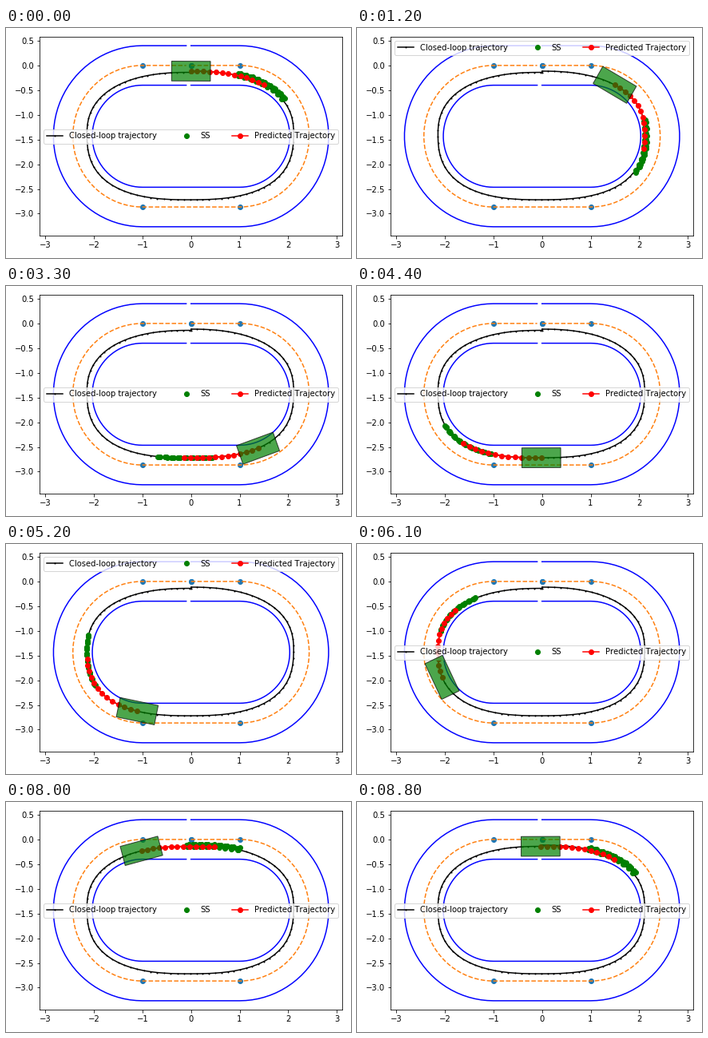
Animation of 432 by 288 pixels, one loop 8.9 s. Source, as a matplotlib script:

```python
import numpy as np
import matplotlib.pyplot as plt
from matplotlib.animation import FuncAnimation
from matplotlib.patches import Polygon

FRAMES, LAP = 89, 88
HORIZON = 12
RADIUS = 4.5 / np.pi          # centreline radius of the two bends
HALF_WIDTH = 0.4
CAR_L, CAR_W = 0.4, 0.2
LAP_SHIFT = np.array([-.03, -.025])


def track(s, offset):
    """Point on the stadium at centreline length s, moved outwards by offset."""
    r = RADIUS + offset
    if s <= 1:
        return s, offset
    if s <= 5.5:
        a = (s - 1) / RADIUS
        return 1 + r * np.sin(a), -RADIUS + r * np.cos(a)
    if s <= 7.5:
        return 6.5 - s, -RADIUS - r
    if s <= 12:
        a = (s - 7.5) / RADIUS
        return -1 - r * np.sin(a), -RADIUS - r * np.cos(a)
    return s - 13, offset


def racing_line(samples=4001):
    """Egg-shaped superellipse, clockwise from the top, with arc fractions."""
    a = np.linspace(0, 2 * np.pi, samples)
    s, c = np.sin(a), np.cos(a)
    power = np.where(c > 0, 2 / 2.36, 2 / 2.62)
    height = np.where(c > 0, 1.253, 1.338)
    x = 2.12 * np.sign(s) * np.abs(s) ** power
    y = -1.38 + height * np.sign(c) * np.abs(c) ** power
    arc = np.append(0, np.cumsum(np.hypot(np.diff(x), np.diff(y))))
    return arc / arc[-1], x, y


ARC, LINE_X, LINE_Y = racing_line()


def position(t):
    """Place at step t; the second lap starts slightly shifted and merges."""
    t = np.atleast_1d(np.asarray(t, float))
    over = t > LAP
    u = (t - LAP * over) / LAP
    half = np.clip(2 * u - 1, 0, 1)
    # steady speed, a little quicker out of the bottom straight
    arc = u + .0118 * np.sin(np.pi * half ** .8) ** 2
    p = np.column_stack([np.interp(arc, ARC, LINE_X),
                         np.interp(arc, ARC, LINE_Y) + .012])
    fade = np.where(over, np.clip(1 - (t - LAP) / 20, 0, 1), u)
    return p + fade[:, None] * LAP_SHIFT


def heading(t):
    t = np.atleast_1d(np.asarray(t, float))
    d = position(t + .5) - position(np.maximum(t - .5, 0))
    return np.arctan2(d[:, 1], d[:, 0])


def safe_set(n):
    """Points of four earlier laps ahead of the car, widest in the first bend."""
    lanes = []
    for weight, lag in zip((1, .8, .3, 0), (.1, .45, .25, .35)):
        t = n + np.arange(8, 17) - lag
        spread = weight * .06 * np.cos(np.pi * (t - 12) / LAP) ** 4
        a = heading(t)
        side = np.column_stack([-np.sin(a), np.cos(a)])
        lanes.append(position(t) + spread[:, None] * side)
    return np.vstack(lanes)


def car_corners(n):
    a = heading(n)[0] - .06 * np.sin(2 * np.pi * n / LAP)   # slight drift
    c, s = np.cos(a), np.sin(a)
    box = np.array([(1, 1), (1, -1), (-1, -1), (-1, 1)]) * (CAR_L, CAR_W)
    return position(n) + box @ np.array([(c, s), (-s, c)])


plt.rcParams["text.kerning_factor"] = 6
fig, ax = plt.subplots(figsize=(6, 4), dpi=72)

ends = np.array([track(s, 0) for s in (0, 1, 5.5, 7.5, 12, 13)])
ax.plot(ends[:, 0], ends[:, 1], "o")
for offset, style in ((0, "--"), (HALF_WIDTH, "-b"), (-HALF_WIDTH, "-b")):
    edge = np.array([track(i / 10, offset) for i in range(130)])
    ax.plot(edge[:, 0], edge[:, 1], style)

lap = position(np.append(np.arange(LAP + 1), LAP + .25))
ax.plot(lap[:, 0], lap[:, 1], "-ok", markersize=1,
        label="Closed-loop trajectory")
ss_line, = ax.plot([], [], "og", label="SS")
pred_line, = ax.plot([], [], "-or", label="Predicted Trajectory")
car = ax.add_patch(Polygon(car_corners(0), closed=True, fc="g", ec="k",
                           alpha=0.7, zorder=10))

reach_x, reach_y = 1 + RADIUS + HALF_WIDTH, RADIUS + HALF_WIDTH
ax.set_xlim(-1.1 * reach_x, 1.1 * reach_x)
ax.set_ylim(-RADIUS - 1.1 * reach_y, -RADIUS + 1.1 * reach_y)
fig.tight_layout()
legend = ax.legend(loc="center", mode="expand", ncol=3)


def update(n):
    ss = safe_set(n)
    pred = position(n + np.arange(HORIZON + 1))
    ss_line.set_data(ss[:, 0], ss[:, 1])
    pred_line.set_data(pred[:, 0], pred[:, 1])
    car.set_xy(car_corners(n))
    # the legend moves up when too many points lie behind it
    y = np.append(ss[:, 1], pred[:, 1])
    crowded = np.sum(np.abs(y + RADIUS) < .147) >= 7
    legend.set_loc("upper center" if crowded else "center")
    return ss_line, pred_line, car, legend


anim = FuncAnimation(fig, update, frames=FRAMES, interval=100,
                     repeat=True, repeat_delay=0, blit=False)
plt.show()
```
